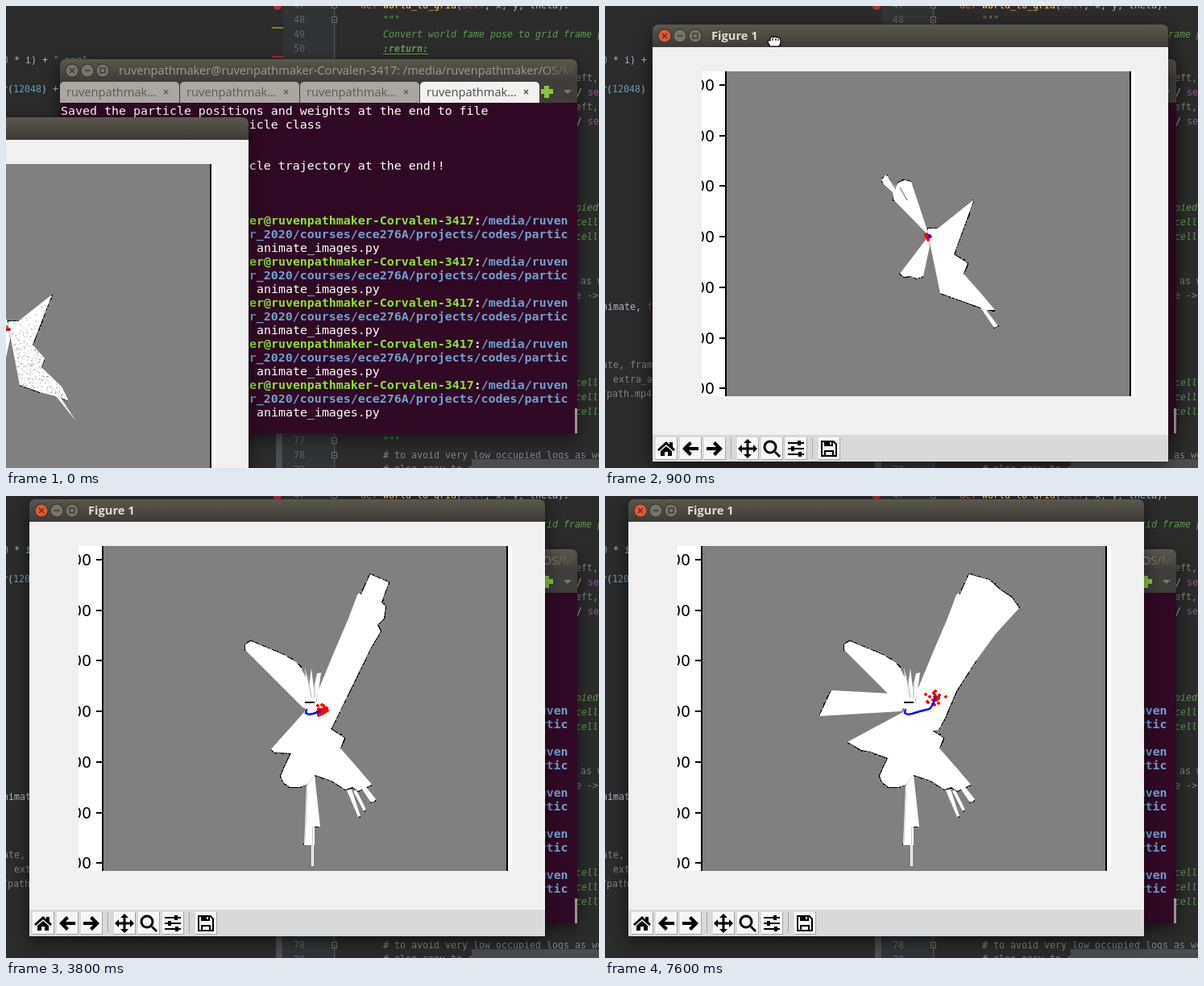
These frames come from a looping animation (736 by 573 pixels, 8000 ms). An HTML page with a canvas:

```html
<!DOCTYPE html>
<html lang="en">
<head>
<meta charset="utf-8">
<title>Particle filter map</title>
<style>
html, body { margin: 0; width: 736px; height: 573px; overflow: hidden; background: #2b2b2b; }
canvas { display: block; }
</style>
</head>
<body>
<canvas id="stage" width="736" height="573"></canvas>
<script>
const ctx = document.getElementById('stage').getContext('2d');
const LOOP = 8000;
const MONO = '"DejaVu Sans Mono", monospace';
const UI = '"Open Sans", sans-serif';
const CODE = '11.63px ' + MONO;
const DOC = 'italic ' + CODE;
const USER = 'ruvenpathmaker';
const HOST = USER + '-Corvalen-3417';

function rect(x, y, w, h, color) {
  ctx.fillStyle = color;
  ctx.fillRect(x, y, w, h);
}

// Coloured runs of text on one line: text, color, text, color...
function text(x, y, font, ...runs) {
  ctx.font = font;
  for (let i = 0; i < runs.length; i += 2) {
    ctx.fillStyle = runs[i + 1];
    ctx.fillText(runs[i], x, y);
    x += ctx.measureText(runs[i]).width;
  }
}

function line(path, color, width) {
  ctx.strokeStyle = color;
  ctx.lineWidth = width;
  ctx.stroke(new Path2D(path));
}

function shape(path, color) {
  ctx.fillStyle = color;
  ctx.fill(new Path2D(path));
}

function disc(x, y, r, color) {
  ctx.fillStyle = color;
  ctx.beginPath();
  ctx.arc(x, y, r, 0, 7);
  ctx.fill();
}

function randomizer(seed) {
  return () => (seed = seed * 16807 % 2147483647) / 2147483647;
}

function windowFrame(x, y, w, h, closeColor) {
  const bar = ctx.createLinearGradient(0, y, 0, y + 28);
  bar.addColorStop(0, '#5a574d');
  bar.addColorStop(1, '#3c3b37');
  ctx.save();
  ctx.shadowColor = 'rgba(0,0,0,.55)';
  ctx.shadowBlur = 22;
  ctx.shadowOffsetY = 6;
  ctx.fillStyle = bar;
  ctx.beginPath();
  ctx.roundRect(x, y, w, h, [7, 7, 0, 0]);
  ctx.fill();
  ctx.restore();
  const cy = y + 14;
  [15, 34, 53].forEach((dx, i) => {
    disc(x + dx, cy, 8.5, '#34332f');
    disc(x + dx, cy, 7.5, i ? '#77746b' : closeColor);
  });
  const a = x + 15, b = x + 34, c = x + 53;
  line(`M${a - 3} ${cy - 3}l6 6m0 -6l-6 6M${b - 3.5} ${cy}h7M${c - 3} ${cy - 3}h6v6h-6z`, '#3c3b37', 1.4);
}

function editor() {
  const plain = '#a9b7c6', grey = '#808080', green = '#629755', blue = '#6897bb', purple = '#94558d';
  rect(0, 0, 736, 573, '#2b2b2b');
  rect(344, 0, 66, 573, '#313335');
  rect(335, 528, 8, 45, '#4c4e4f');
  rect(330, 26, 14, 2, '#85801f');
  rect(330, 62, 14, 2, '#a33030');
  disc(337, 0, 5, '#a63232');
  line('M407.5 0V573', '#555', 1);
  for (let n = 47; n < 80; n++) text(357, 21 + (n - 48) * 18, CODE, String(n), '#606366');
  for (const y of [-1, 17, 539, 557]) {
    rect(404, y - 3, 7, 7, '#313335');
    line(`M404.5 ${y - 3.5}h6v7h-6zM406 ${y + .5}h3`, '#6c6e70', 1);
  }

  text(-4, 71, CODE, '0', blue, ' * i) + ', plain, '".png"', '#6a8759');
  text(-5, 107, CODE, 'r(', plain, '12048', blue, ') +', plain);
  text(-4, 377, CODE, 'nimate, ', plain, 'frames', '#aa4926');
  text(-4, 449, CODE, 'ate, frames', grey);
  text(-4, 467, CODE, ', extra_args', grey);
  text(-5, 485, CODE, '/path.mp4"', grey);

  text(440, 3, CODE, 'def ', '#cc7832', 'world_to_grid', '#ffc66d', '(', plain, 'self', purple, ', x, y, theta):', plain);
  text(468, 21, CODE, '"""', green);
  text(468, 39, DOC, 'Convert world fame pose to grid frame pose', green);
  text(468, 57, 'bold ' + DOC, ':return:', green);
  rect(468, 59, 56, 1, green);
  for (const y of [93, 129]) {
    text(700, y, CODE, 'left,', grey);
    text(708, y + 18, CODE, '/ ', plain, 'self', purple);
  }
  text(693, 254, DOC, 'cupied', green);
  for (const y of [272, 290, 471, 489, 507]) text(707, y, DOC, 'cell', green);
  text(713, 345, CODE, 'as we', grey);
  text(707, 363, CODE, 'e ->', grey);
  text(468, 543, CODE, '"""', green);
  text(468, 561, CODE, '# to avoid very low occupied logs as well', grey);
  text(468, 578, CODE, '# also easy to check', grey);
  rect(578, 562, 158, 11, '#4a4d4f');
}

function terminal() {
  windowFrame(67, 66, 642, 464, '#77746b');
  const fade = ctx.createLinearGradient(665, 0, 708, 0);
  fade.addColorStop(0, '#9c998f');
  fade.addColorStop(1, 'rgba(156,153,143,0)');
  text(140, 85, '14.67px ' + UI, `${USER}@${HOST}: /media/${USER}/OS/M`, fade);

  rect(67, 94, 642, 26, '#3f3e3a');
  for (let i = 0; i < 4; i++) {
    const x = 67 + i * 149, active = i === 3;
    const ink = active ? '#4c4c4c' : '#5f5c57';
    ctx.fillStyle = active ? '#f2f1f0' : '#aaa6a1';
    ctx.beginPath();
    ctx.roundRect(x, 94, 148, 26, [5, 5, 0, 0]);
    ctx.fill();
    text(x + 8, 112, '14.67px ' + UI, 'ruvenpathmak…', ink);
    line(`M${x + 129} 104l5 5m0 -5l-5 5`, ink, 1.3);
  }
  rect(668, 99, 6, 15, '#8bc63f');
  rect(664, 103, 15, 6, '#8bc63f');
  shape('M692 104h10l-5 5z', '#77746b');

  rect(67, 120, 642, 410, '#300a24');
  rect(706, 499, 3, 31, '#9b9390');
  const font = '14.95px ' + MONO, bold = 'bold ' + font;
  const white = '#fff', green = '#8ae234', blue = '#729fcf';
  const row = n => 135 + n * 17;
  ['Saved the particle positions and weights at the end to file',
    'In get_best_traj_from_particle class', '12048', '12048 12049',
    'Saved the final best particle trajectory at the end!!', '', 'SLAM DUNK!!']
    .forEach((s, i) => text(68, row(i), font, s, white));
  for (let n = 8; n < 23; n += 3) {
    text(68, row(n), font, '(ece276a_hw3) ', white);
    text(194, row(n), bold, `${USER}@${HOST}`, green, ':', white, '/media/ruven', blue);
    text(68, row(n + 1), bold, 'pathmaker/OS/MS_UCSD/Winter_2020/courses/ece276A/projects/codes/partic', blue);
    text(68, row(n + 2), bold, 'le_filter_slam/src', blue);
    text(230, row(n + 2), font, '$ python animate_images.py', white);
  }
  line('M67.5 511.5h10v17h-10z', white, 1);
}

const ICONS = [
  [46, 'M-11 1L0 -9L4 -5V-8H8V-2L11 1L9 3L0 -5L-9 3zM-7 3L0 -3L7 3V9H2V4H-2V9H-7z'],
  [76, 'M-10 0L-1 -9L2 -6L-2 -2H10V2H-2L2 6L-1 9z'],
  [106, 'M10 0L1 -9L-2 -6L2 -2H-10V2H2L-2 6L1 9z'],
  [147, 'M0 -12L5 -7H1.5V-1.5H7V-5L12 0L7 5V1.5H1.5V7H5L0 12L-5 7H-1.5V1.5H-7V5L-12 0L-7 -5V-1.5H-1.5V-7H-5z'],
  [177, 'M3 5L5 3L11 9L9 11z'],
  [207, 'M-10 -8H10V-6H-10zM-10 -1H10V1H-10zM-10 6H10V8H-10zM2 -10H6V-4H2zM-6 -3H-2V3H-6zM3 4H7V10H3z'],
  [248, 'M-10 -10H6L10 -6V10H-10zM-8 -8V8H-6V2H6V8H8V-5L5 -8V-3H-6V-8zM-4 4V8H4V4zM1 -8V-5H3V-8z']
];

function toolbar() {
  rect(29, 513, 640, 33, '#d9d9d9');
  rect(126, 516, 1, 26, '#a8a8a8');
  rect(227, 516, 1, 26, '#a8a8a8');
  for (const [x, icon] of ICONS) {
    rect(x - 13, 516, 27, 28, '#a5a5a5');
    rect(x - 13, 516, 26, 27, '#fff');
    rect(x - 12, 517, 25, 26, '#f6f6f6');
    ctx.save();
    ctx.translate(x, 530);
    ctx.fillStyle = '#000';
    ctx.fill(new Path2D(icon), x === 248 ? 'evenodd' : 'nonzero');
    if (x === 177) line('M5 -2A7 7 0 1 1 -9 -2A7 7 0 1 1 5 -2z', '#000', 3);
    ctx.restore();
  }
}

// Stage start, visible path points, particle centre, spread, particle count
const STAGES = [
  [0, 0, 371, 267, 1, 4], [600, 2, 371, 267, 4, 14], [1200, 2, 371, 268, 6, 18],
  [1700, 3, 374, 269, 6, 20], [2100, 4, 380, 268, 7, 24], [3800, 5, 391, 266, 8, 30],
  [4300, 6, 394, 264, 8, 28], [4700, 7, 397, 261, 9, 28], [5400, 8, 401, 258, 9, 26],
  [6000, 9, 404, 255, 10, 26], [6500, 10, 406, 253, 11, 24], [7000, 11, 408, 251, 12, 24],
  [7600, 12, 410, 250, 13, 24]
];
const TRACK = [[373, 264], [372, 269], [376, 271], [381, 270], [391, 267], [395, 266],
  [399, 265], [403, 264], [406, 260], [408, 256], [409, 252], [411, 249]];

// Mapped areas: first stage, end stage, free space, walls
const AREAS = [
  [0, 1, 'M371 267V257H383L425 224L401 286L416 303L412 314L437 338L446 356L436 352L455 381L430 350L410 345L385 336L374 279z',
    'M371 257H383M425 224L401 286M416 303L412 314M385 336L410 345M436 352L446 356'],
  [1, 13, 'M371 267V257H383L428 221L403 289L420 300L415 313L438 339L454 358L443 358L458 378L453 380L436 355L386 337L374 279z',
    'M371 257H383M428 221L403 289L420 300L415 313M386 337L436 355L454 359M458 378L453 380'],
  [0, 4, 'M371 262L350 199L342 197L334 200L331 206L319 190L313 197L317 203L327 212L328 221L368 262z',
    'M350 199L342 197L334 200V206M321 190L313 197L317 203M328 213V222'],
  [0, 13, 'M371 267L336 313L341 317L349 316L357 319L365 316L373 279z', 'M336 313L341 317L349 316L357 319L365 316'],
  [4, 13, 'M297 184L304 180L345 197L360 206L366 213L372 228L378 250L383 257L380 266L368 262L297 191z',
    'M297 191V184L304 180L345 197L360 206L366 213'],
  [4, 13, 'M371 267L329 314L333 318L354 319L344 340L350 350L386 337L400 289z', 'M329 314L333 318L354 319L344 340'],
  [5, 13, 'M371 267L354 319L341 347L344 355L352 361L364 361L374 358L383 346L404 353L421 364L430 361L437 366L454 358L415 313L403 289z',
    'M354 319L341 347L344 355L352 361L364 361L374 358M383 346L404 353L421 364L430 361L437 366L454 358'],
  [5, 13, 'M373 360L383 346L390 410H383V433H370z', 'M370 432H383M384 410H390'],
  [5, 13, 'M379 433H382V459H379z', ''],
  [5, 13, 'M423 365L429 364L440 397L437 398zM431 366L435 365L447 389L444 391zM440 361L447 361L459 376L456 380z',
    'M440 397L437 398M447 389L444 391M459 376L456 380'],
  [5, 13, 'M385 257L388 240L407 194L425 152L437 120L441 122L452 97L475 107L466 132L471 137L469 152L461 160L465 168L454 186L404 288L380 275z',
    'M437 121L441 122L452 97L475 107L466 132L471 137L469 152L461 160L465 168L454 186L404 288'],
  [6, 7, 'M276 266L271 273L368 267z', 'M276 266L271 273'],
  [7, 11, 'M277 246L266 273L368 267L360 260z', 'M277 246L266 273'],
  [8, 9, 'M440 130L471 117V140L463 160L448 190L420 255L408 288L390 270z', 'M471 140L463 160L448 190L420 255L408 288'],
  [9, 13, 'M441 122L452 97L484 115L466 152L462 162L448 190L420 255L408 288L390 270z',
    'M452 97L484 115L466 152L462 162L448 190L420 255L408 288'],
  [10, 11, 'M441 122L470 104L488 118L468 160L450 195L424 255L410 285z', 'M470 104L488 118'],
  [10, 11, 'M370 268L310 303L335 318L360 320z', 'M310 303L335 318'],
  [11, 12, 'M441 122L452 97L490 116L512 134L480 175L456 207L432 246L414 290L403 292L390 270z', 'M477 105L490 116L512 134'],
  [11, 13, 'M281 241L266 273L368 267L371 260L355 245z', 'M281 241L266 273'],
  [11, 13, 'M370 268L301 305L318 315L329 317L351 325L357 318z', 'M301 305L318 315L329 317L351 325'],
  [12, 13, 'M441 122L452 97L477 104L490 116L505 126L514 139L484 172L460 205L436 242L422 275L414 290L403 292L390 270z',
    'M452 97L477 104L490 116L505 126L514 139M460 205L436 242L422 275L414 290']
];

// Ragged grid cells along a wall, with a few gaps
function wallCells(path) {
  const guide = document.createElementNS('http://www.w3.org/2000/svg', 'path');
  const random = randomizer(path.length * 7919 + 5);
  const cells = [];
  guide.setAttribute('d', path);
  for (let d = 0, end = path && guide.getTotalLength(); d < end; d += 1.5) {
    const p = guide.getPointAtLength(d);
    if (random() < .85) cells.push([Math.round(p.x + random() - 1.5), Math.round(p.y + random() - 1.5)]);
  }
  return cells;
}

const MAP = AREAS.map(([from, to, free, wall]) => ({ from, to, free, cells: wallCells(wall) }));

function occupancyMap(stage) {
  const areas = MAP.filter(({ from, to }) => stage >= from && stage < to);
  for (const { cells } of areas) for (const [x, y] of cells) rect(x, y, 2, 2, '#000');
  for (const { free } of areas) shape(free, '#fff');
  if (stage >= 4) {
    shape('M366 258V213L372 225L371 212L376 235L379 214L382 238L386 220L391 219L388 242L384 257z', '#fff');
    line('M374 222L379 250M383 230V250', '#aaa', 1);
    line('M371 256H383', '#000', 2);
  }
  if (stage >= 5) line('M374 365L371 430M380.5 410V458', '#d0d0d0', 1);
  if (stage >= 7 && stage < 11) line('M278 249L362 263', '#808080', 1.5);
  if (stage < 4) line('M322 194L331 208M336 206L345 222', '#555', 1);
  if (stage === 0) {
    const random = randomizer(41);
    ctx.save();
    ctx.clip(new Path2D(MAP[0].free));
    for (let i = 0; i < 2400; i++) {
      const x = 374 + random() * 84, y = 225 + random() * 155;
      if (random() < (y - 215) / 150) rect(x | 0, y | 0, 1, 1, random() < .4 ? '#999' : '#ccc');
    }
    ctx.restore();
  }

  const [, points, cx, cy, spread, count] = STAGES[stage];
  const random = randomizer(977 + stage * 131);
  for (let i = 0; i < count; i++) {
    const angle = random() * 6.283, r = spread * random();
    const x = Math.round(cx + r * Math.cos(angle)), y = Math.round(cy + r * Math.sin(angle));
    rect(x - 2, y - 1, 4, 2, '#f00');
    rect(x - 1, y - 2, 2, 4, '#f00');
  }
  if (points) line('M' + TRACK.slice(0, points).join('L'), '#00f', 2.4);
}

function figure(x, y, stage) {
  ctx.save();
  ctx.translate(x - 29, y - 4);
  windowFrame(29, 4, 640, 542, '#e6582f');
  text(102, 23, 'bold 14.67px ' + UI, 'Figure 1', '#dfdbd2');
  rect(29, 32, 640, 481, '#f0f0f0');
  toolbar();
  rect(90, 62, 538, 403, '#fff');
  rect(119, 62, 504, 403, '#000');
  rect(121, 62, 500, 403, '#808080');
  ctx.beginPath();
  ctx.rect(90, 62, 538, 403);
  ctx.clip();
  for (let i = 0; i < 7; i++) {
    const tick = Math.round(79 + i * 62.7);
    text(82, tick + 7, '19px "DejaVu Sans", sans-serif', '00', '#000');
    rect(112, tick - 1, 7, 2, '#000');
  }
  occupancyMap(stage);
  ctx.restore();
}

function grabHand(x, y) {
  ctx.save();
  ctx.translate(x, y);
  const hand = 'M-5 6L-8 1Q-8 -2 -5 -1V-4Q-3 -7 -1 -5Q1 -7 3 -5Q5 -6 6 -4Q8 -4 8 -1V2L6 6z';
  shape(hand, '#fff');
  line(hand + 'M-2 -4v3M2 -4v3M5 -3v2', '#000', 1.2);
  ctx.restore();
}

// Window and pointer positions while dragging, one per 100 ms from 500 ms
const DRAG = [[-110, 75, 55, 92], [166, -5, 333, 11], [122, 6, 288, 23], [86, 15, 245, 34],
  [59, 23, 210, 44], [48, 16, 203, 37], [39, 9, 197, 30], [32, 5, 193, 25], [30, 4, 193, 25]];

function draw(tick) {
  const t = tick * 100;
  const stage = STAGES.findLastIndex(s => s[0] <= t);
  const [x, y, handX, handY] = t < 500 ? [-339, 138] : DRAG[tick - 5] || [29, 4, 193, 25];
  editor();
  terminal();
  figure(x, y, stage);
  if (t >= 500 && t < 1600) grabHand(handX, handY);
}

let shown = -1;
function animate() {
  const tick = Math.floor(performance.now() % LOOP / 100);
  if (tick !== shown) draw(shown = tick);
  requestAnimationFrame(animate);
}
animate();
</script>
</body>
</html>
```
